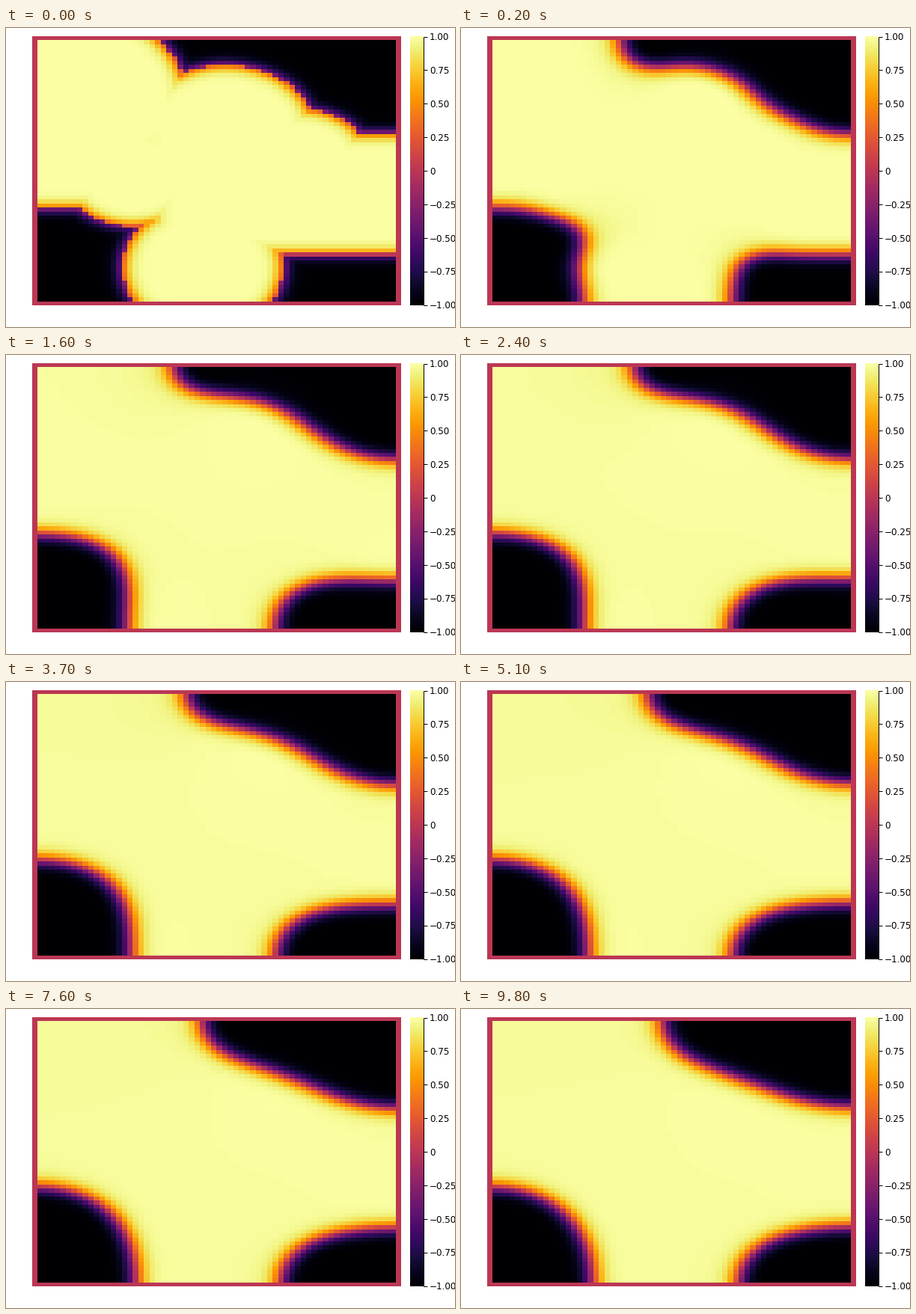
Recreate the animation shown at these times as a matplotlib script. Size 600 by 400 pixels, loop 10000 ms.

```python
import numpy as np
import matplotlib.pyplot as plt
from matplotlib.animation import FuncAnimation

W, H = 600, 400
N = 64                       # interior cells per side
FRAMES, INTERVAL = 100, 100
DT, STEPS = 0.25, 24         # solver step, steps per frame
KAPPA = 2.0                  # gradient energy
X0, X1, Y0, Y1 = 35, 528, 11.5, 371


def blob(x, y, cx, cy, rx, ry=None):
    """Approximate depth inside an ellipse, negative outside."""
    ry = ry or rx
    return rx * (1 - np.hypot((x - cx) / rx, (y - cy) / ry))


def box(x, y, left, right, top, bottom):
    """Depth inside a rectangle, negative outside."""
    return np.min([x - left, right - x, y - top, bottom - y], axis=0)


def initial_field():
    """Bright phase as a union of overlapping shapes, in cell units."""
    x, y = np.meshgrid(np.arange(N) + 0.5, np.arange(N) + 0.5)
    depth = np.max([
        blob(x, y, 4, 14, 22.6),
        blob(x, y, 33.5, 22, 16),
        blob(x, y, 47, 29, 12.2),
        blob(x, y, 17, 33, 12.6),
        blob(x, y, 29.5, 55.7, 14.4, 15.9),
        box(x, y, -N, 23, 10, 41.2),
        box(x, y, 20, 2 * N, 22.8, 52.5),
    ], axis=0)
    return np.tanh((depth + 0.45 * np.sign(depth)) / 1.8)


def evolve(u):
    """Cahn-Hilliard flow with no-flux walls, one field per frame."""
    k = np.arange(N)
    dct = np.sqrt(2 / N) * np.cos(np.pi * np.outer(k, k + 0.5) / N)
    dct[0] /= np.sqrt(2)
    lam = 2 - 2 * np.cos(np.pi * k / N)
    lam = lam[:, None] + lam[None, :]
    damp = 1 / (1 + DT * lam * (2 + KAPPA * lam))
    fields = [u]
    uh = dct @ u @ dct.T
    for _ in range(FRAMES - 1):
        for _ in range(STEPS):
            force = dct @ (u**3 - 3 * u) @ dct.T
            uh = (uh - DT * lam * force) * damp
            u = dct.T @ uh @ dct
        fields.append(u)
    return [np.pad(f, 1) for f in fields]


fields = evolve(initial_field())

fig = plt.figure(figsize=(W / 100, H / 100), dpi=100, facecolor="white")
ax = fig.add_axes([0, 0, 1, 1])
ax.axis("off")
style = dict(cmap="inferno", vmin=-1, vmax=1, interpolation="nearest",
             aspect="auto")
heat = ax.imshow(fields[0], extent=(X0, X1, Y1, Y0), **style)

ramp = np.linspace(1, -1, 256)[:, None]
ax.imshow(ramp, extent=(540, 558, Y1, Y0), **style)
line = dict(color="black", lw=0.72, solid_capstyle="butt")
ax.plot([557.5, 557.5], [Y0, Y1], **line)
for v in np.linspace(-1, 1, 9):
    y = Y0 + (1 - v) / 2 * (Y1 - Y0)
    ax.plot([558, 563], [y, y], **line)
    label = f"{v:.2f}".replace("-", "\u2212") if v else "0"
    ax.text(566, y + 4.4, label, fontsize=8.64, family="DejaVu Sans",
            color="black", va="baseline")
ax.set_xlim(0, W)
ax.set_ylim(H, 0)


def update(i):
    heat.set_data(fields[i])
    return [heat]


anim = FuncAnimation(fig, update, frames=FRAMES, interval=INTERVAL,
                     repeat=True, repeat_delay=0)
plt.show()
```
